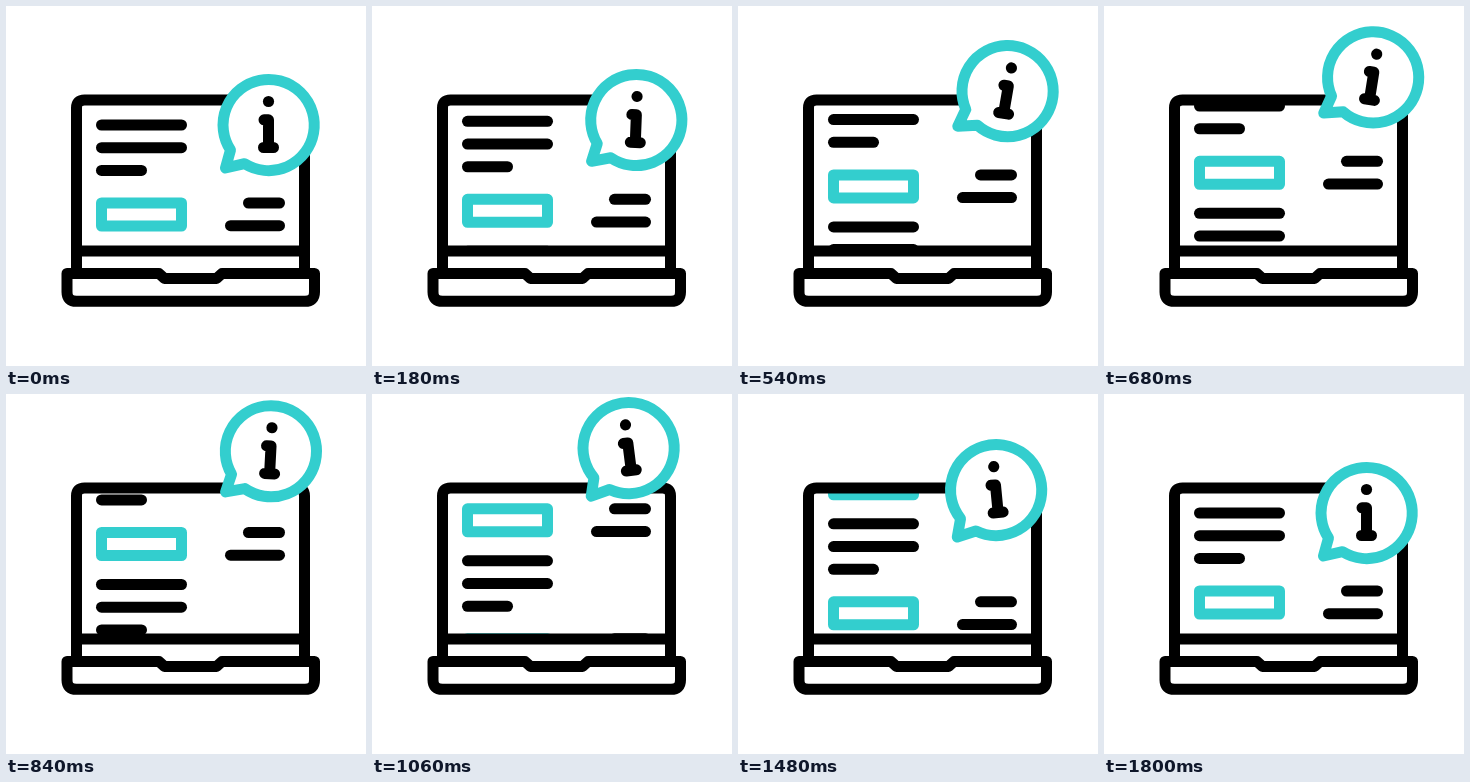
An HTML page with a canvas that plays this animation: 360x360 px, repeating every 1820 ms.

```html
<!DOCTYPE html>
<html lang="en">
<head>
<meta charset="utf-8">
<title>Laptop info</title>
<style>
  html, body { margin: 0; width: 100%; height: 100%; overflow: hidden; background: #fff; }
  canvas { display: block; width: 360px; height: 360px; }
</style>
</head>
<body>
<canvas id="stage"></canvas>
<script>
const SIZE = 360, LOOP = 1820, STEP = 20, SPAN = 1800;
const BLACK = '#000', TEAL = '#33cece', WHITE = '#fff';
const PAGE = 130;   // scroll distance of one loop
const LIFT = 65;    // height of the bubble's hop
const TIP = { x: 217.5, y: 164 };

const canvas = document.getElementById('stage');
const ctx = canvas.getContext('2d');
const dpr = window.devicePixelRatio || 1;
canvas.width = canvas.height = SIZE * dpr;

const laptop = new Path2D(
  'M70.5 267 V102 Q70.5 94 78.5 94 H290.5 Q298.5 94 298.5 102 V267 M70.5 245 H298.5');
const base = new Path2D(
  'M61 267.5 H153 L158.5 272.5 H210.5 L216 267.5 H308.5 V286 Q308.5 295.3 299 295.3 H70.5 Q61 295.3 61 286 Z');
const bubble = new Path2D(
  'M224.5 144 A45.6 45.6 0 1 1 238.5 157.7 L219.5 162 Z');
const letter = new Path2D(
  'M258 113.8 H262.5 V141.5 M257.5 141.5 H267.5');

// x from, x to, y
const lines = [
  [95.5, 175.5, 119], [95.5, 175.5, 141.7], [95.5, 135.5, 164.4],
  [242.5, 273.5, 197], [224.5, 273.5, 219.7]
];

const ease = u => u * u * (3 - 2 * u);

// keys: [time, value] pairs, eased between neighbours
function track(keys, t) {
  for (let i = 1; i < keys.length; i++) {
    const [t0, a] = keys[i - 1], [t1, b] = keys[i];
    if (t <= t1) return a + (b - a) * ease((t - t0) / (t1 - t0));
  }
  return keys[keys.length - 1][1];
}

const scrollKeys = [[0, 0], [SPAN, PAGE]];
const liftKeys = [[0, 0], [SPAN / 2, LIFT], [SPAN, 0]];
const tiltKeys = [[0, 0], [SPAN / 3, 10], [SPAN * 2 / 3, -10], [SPAN, 0]];

function stroke(path, color) {
  ctx.strokeStyle = color;
  ctx.stroke(path);
}

function drawPage(y) {
  ctx.save();
  ctx.translate(0, y);
  for (const [x0, x1, ly] of lines) {
    const p = new Path2D();
    p.moveTo(x0, ly);
    p.lineTo(x1, ly);
    stroke(p, BLACK);
  }
  ctx.strokeStyle = TEAL;
  ctx.strokeRect(95.5, 197, 80, 23);
  ctx.restore();
}

function drawBubble(t) {
  ctx.save();
  ctx.translate(TIP.x, TIP.y - track(liftKeys, t));
  ctx.rotate(track(tiltKeys, t) * Math.PI / 180);
  ctx.translate(-TIP.x, -TIP.y);
  ctx.fillStyle = WHITE;
  ctx.fill(bubble);
  stroke(bubble, TEAL);
  stroke(letter, BLACK);
  ctx.fillStyle = BLACK;
  ctx.beginPath();
  ctx.arc(262.5, 95.5, 5.6, 0, Math.PI * 2);
  ctx.fill();
  ctx.restore();
}

function draw(t) {
  ctx.setTransform(dpr, 0, 0, dpr, 0, 0);
  ctx.fillStyle = WHITE;
  ctx.fillRect(0, 0, SIZE, SIZE);
  ctx.lineWidth = 11;
  ctx.lineCap = ctx.lineJoin = 'round';

  const y = -track(scrollKeys, t);
  ctx.save();
  ctx.beginPath();
  ctx.rect(70, 95, 228, 150);
  ctx.clip();
  drawPage(y);
  drawPage(y + PAGE);
  ctx.restore();

  stroke(laptop, BLACK);
  ctx.fillStyle = WHITE;
  ctx.fill(base);
  stroke(base, BLACK);
  drawBubble(t);
}

const start = performance.now();
function tick() {
  const t = (performance.now() - start) % LOOP;
  draw(Math.floor(t / STEP) * STEP);
  requestAnimationFrame(tick);
}
tick();
</script>
</body>
</html>
```
